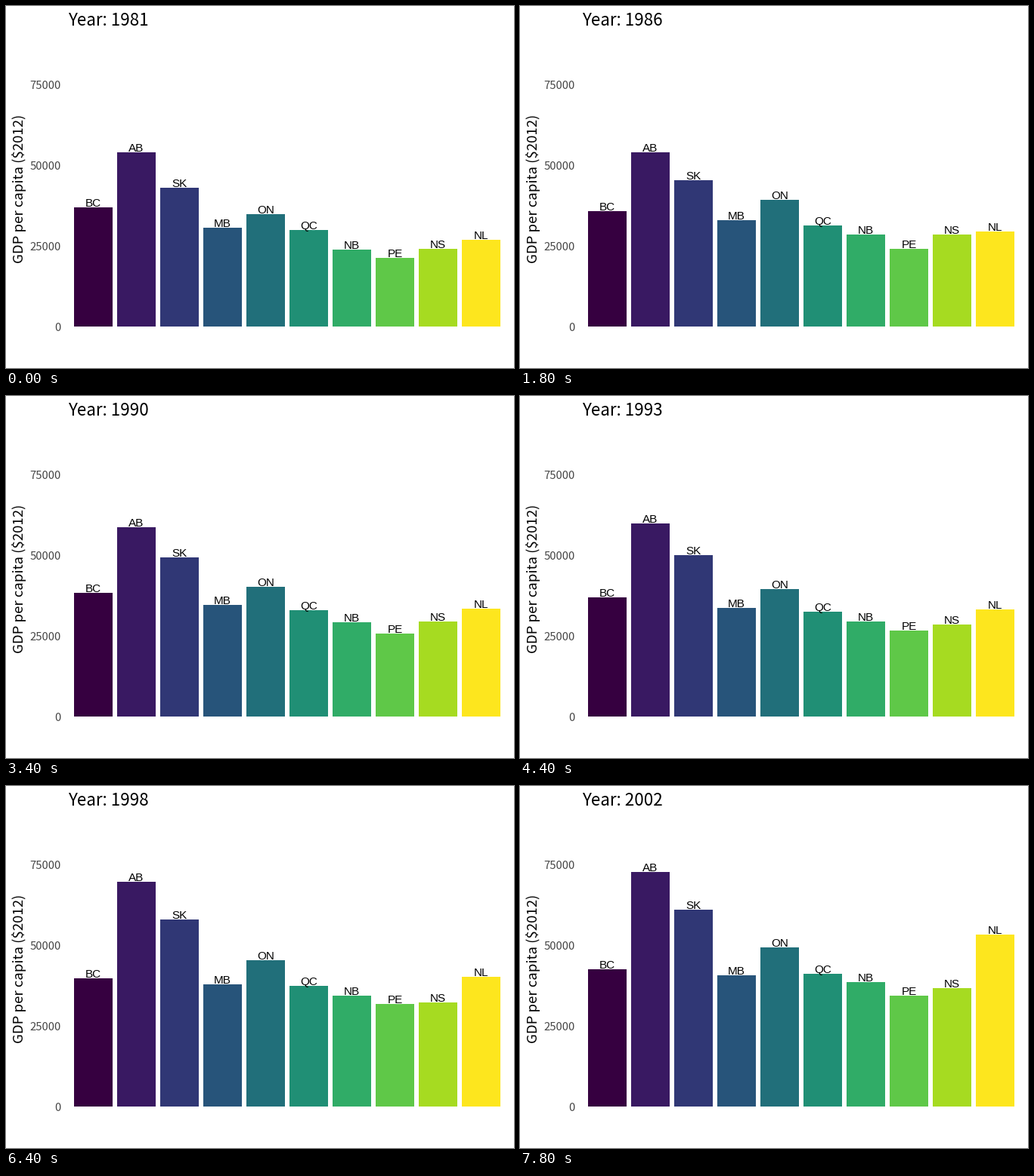
Recreate the animation shown at these times as a matplotlib script. Size 672 by 480 pixels, loop 8000 ms.

```python
import math
import numpy as np
import matplotlib.pyplot as plt
from matplotlib.animation import FuncAnimation
from matplotlib.patches import Rectangle

W, H, DPI = 672, 480, 100
FRAMES, STEP_MS = 40, 200
BASE_Y, PX_PER_K = 425, 4.28
BAR_X, BAR_STEP, BAR_W = 90, 57, 51
FIRST_YEAR, YEARS_PER_STEP = 1981, 0.54
SANS, TITLE_FONT = "Liberation Sans", "Noto Sans CJK JP"

# Province: bar colour and GDP per head, in thousands, at each turning point
TURNS = [0, 9, 17, 28, 35, 39]
PROVINCES = {
    "BC": ("#360040", [36.9, 35.7, 38.3, 37.9, 41.1, 42.5]),
    "AB": ("#391962", [54.0, 54.0, 58.6, 65.4, 72.7, 72.7]),
    "SK": ("#303775", [43.0, 45.3, 49.3, 54.0, 61.0, 61.0]),
    "MB": ("#27547a", [30.6, 32.9, 34.6, 35.0, 40.0, 40.7]),
    "ON": ("#216f7a", [34.8, 39.3, 40.2, 41.1, 48.6, 49.3]),
    "QC": ("#208f75", [29.9, 31.3, 32.9, 34.3, 39.7, 41.1]),
    "NB": ("#30ac67", [23.8, 28.5, 29.2, 31.8, 36.2, 38.6]),
    "PE": ("#5fc848", [21.3, 24.1, 25.6, 29.7, 33.4, 34.3]),
    "NS": ("#a6db21", [24.1, 28.5, 29.4, 29.4, 34.3, 36.7]),
    "NL": ("#fde61e", [26.9, 29.4, 33.4, 35.0, 44.2, 53.3]),
}
SLUMPS = [4, 22]

fig = plt.figure(figsize=(W / DPI, H / DPI), dpi=DPI, facecolor="white")
ax = fig.add_axes([0, 0, 1, 1])
ax.set_xlim(0, W)
ax.set_ylim(H, 0)
ax.axis("off")


def label(x, y, text, px, font=TITLE_FONT, color="black", **kw):
    return ax.text(x, y, text, fontsize=px * 72 / DPI, family=font,
                   color=color, va="baseline", **kw)


def slump(n):
    """Share of output lost to the recessions at step n."""
    return 0.03 * sum(math.exp(-((n - c) / 2.2) ** 2) for c in SLUMPS)


title = label(82, 26, "", 22.4)
label(23, 242, "GDP per capita ($2012)", 18.6, ha="center",
      rotation=90, rotation_mode="anchor")
for k in range(0, 100, 25):
    label(72.6, BASE_Y + 6 - k * PX_PER_K, str(1000 * k), 14.8,
          color="#464646", ha="right")

bars, names = [], []
for i, (name, (color, _)) in enumerate(PROVINCES.items()):
    x = BAR_X + BAR_STEP * i
    bars.append(ax.add_patch(Rectangle((x, BASE_Y), BAR_W, 0, fc=color, lw=0)))
    names.append(label(x + BAR_W / 2, BASE_Y, name, 15.2, SANS, ha="center"))


def draw(n):
    title.set_text(f"Year: {round(FIRST_YEAR + YEARS_PER_STEP * n)}")
    for bar, name, (_, gdp) in zip(bars, names, PROVINCES.values()):
        height = PX_PER_K * np.interp(n, TURNS, gdp) * (1 - slump(n))
        bar.set_y(BASE_Y - height)
        bar.set_height(height)
        name.set_y(BASE_Y - height - 1)
    return [title, *bars, *names]


anim = FuncAnimation(fig, draw, frames=FRAMES, interval=STEP_MS,
                     repeat=True, repeat_delay=0, blit=False)
plt.show()
```
